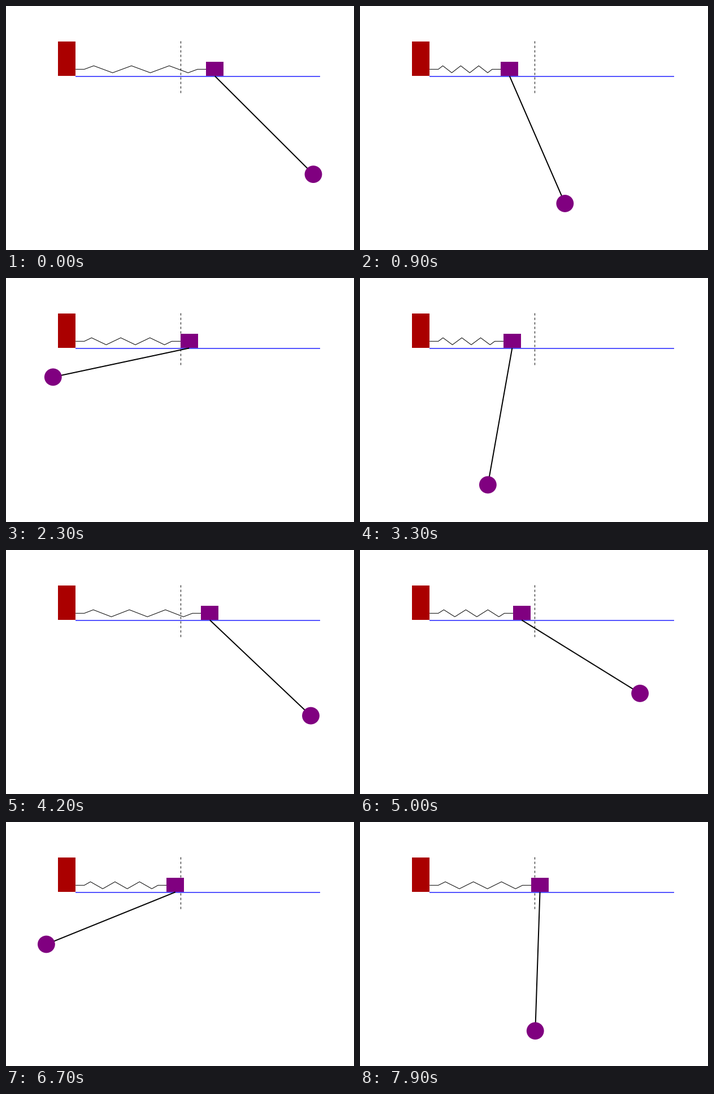
These frames come from a looping animation (616 by 433 pixels, 8 s). A matplotlib script:

```python
import numpy as np
import matplotlib.pyplot as plt
from matplotlib.animation import FuncAnimation
from matplotlib.patches import Circle, Rectangle

W, H, DPI = 616, 433, 64
PX = 72 / DPI                  # points per pixel
FRAMES, STEP_MS, SUBSTEPS = 80, 100, 20

# Cart on a spring with a pendulum hanging from it
M, m, k, L, g = 5.0, 1.0, 50.0, 4.0, 9.81
START = (1.0, np.pi / 4, 0.0, 0.0)   # x, angle, and their rates

UNIT = 61.6                    # pixels per length unit
X0, Y0 = 308.2, 124.4          # rest position of the pivot
WALL = 123.2
SPRING_Y, COIL, LEAD = 112.3, 6.2, 15.4
HALF = UNIT / 4                # half the cart width, also the bob radius
PURPLE = "#800080"


def rates(s):
    x, a, v, w = s
    sn, cs = np.sin(a), np.cos(a)
    acc = (m * sn * (L * w * w + g * cs) - k * x) / (M + m * sn * sn)
    return np.array([v, w, acc, -(acc * cs + g * sn) / L])


def rk4(s, h):
    k1 = rates(s)
    k2 = rates(s + h / 2 * k1)
    k3 = rates(s + h / 2 * k2)
    k4 = rates(s + h * k3)
    return s + h / 6 * (k1 + 2 * k2 + 2 * k3 + k4)


def solve():
    s = np.array(START)
    poses = []
    for _ in range(FRAMES):
        poses.append(s[:2])
        for _ in range(SUBSTEPS):
            s = rk4(s, STEP_MS / 1000 / SUBSTEPS)
    return poses


def spring_points(end):
    """Straight lead, three full waves, straight lead."""
    a, b = WALL + LEAD, end - LEAD
    pitch = (b - a) / 6
    xs = [WALL, a] + [a + pitch * (i + 0.5) for i in range(6)] + [b, end]
    ys = [0, 0] + [-COIL, COIL] * 3 + [0, 0]
    return xs, SPRING_Y + np.array(ys)


poses = solve()

fig = plt.figure(figsize=(W / DPI, H / DPI), dpi=DPI, facecolor="white")
ax = fig.add_axes([0, 0, 1, 1])
ax.set_xlim(0, W)
ax.set_ylim(H, 0)
ax.axis("off")


def line(xs, ys, width, color="black", z=1, **kw):
    return ax.plot(xs, ys, color=color, lw=width * PX, zorder=z,
                   solid_capstyle="butt", dash_capstyle="butt", **kw)[0]


line([308.5, 308.5], [62.4, 154.4], 1, ls=(0, (4 * PX, 4 * PX)))
line([WALL, 556], [125, 125], 2, "#5555ff", z=2)
ax.add_patch(Rectangle((92, 63), 31, 61, fc="#aa0000", lw=0, zorder=3))

spring = line([], [], 1, z=3, solid_joinstyle="miter")
cart = ax.add_patch(Rectangle((0, 99), 2 * HALF, 25, fc=PURPLE, lw=0, zorder=4))
rod = line([], [], 2, z=5)
bob = ax.add_patch(Circle((0, 0), HALF, fc=PURPLE, lw=0, zorder=6))


def draw(i):
    x, angle = poses[i]
    px = X0 + UNIT * x
    bx = px + UNIT * L * np.sin(angle)
    by = Y0 + UNIT * L * np.cos(angle)
    spring.set_data(*spring_points(px - HALF))
    cart.set_x(px - HALF)
    rod.set_data([px, bx], [Y0, by])
    bob.center = bx, by
    return spring, cart, rod, bob


# Dash lengths above are in pixels, so line-width scaling is undone here
ax.lines[0].set_linestyle((0, (4, 4)))

anim = FuncAnimation(fig, draw, frames=FRAMES, interval=STEP_MS,
                     init_func=lambda: draw(0), repeat=True, repeat_delay=0)
plt.show()
```
